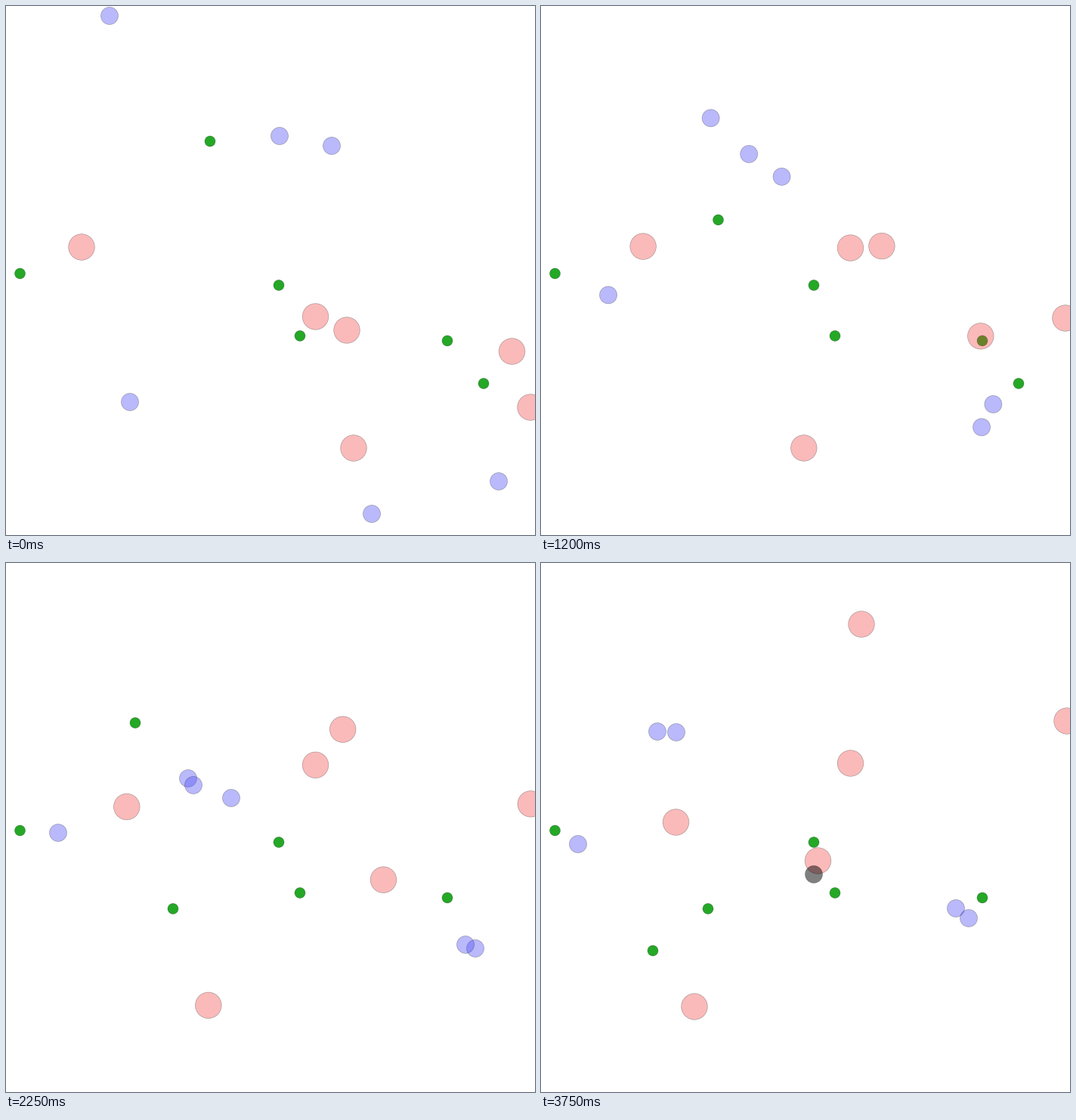
A matplotlib script for the animation above (3.9 s loop, 700 by 700 pixels).

```python
import numpy as np
import matplotlib.pyplot as plt
from matplotlib.animation import FuncAnimation
from matplotlib.patches import Circle

SIZE, DPI = 700, 100
FRAMES, STEP_MS = 26, 150
FRAME = np.arange(FRAMES)
KEYS = np.array([0, 6, 10, 15, 21, 25])

RED = (0.95, 0.21, 0.21, 0.34)
BLUE = (0.30, 0.30, 0.96, 0.39)
GREEN = (0.14, 0.66, 0.15, 1)
DEAD = (0, 0, 0, 0.5)
REACH = 20  # a hunter this close kills


def glide(start, end, bend=(0, 0)):
    """A straight run at steady speed, swelling sideways by bend midway."""
    s = (FRAME / (FRAMES - 1))[:, None]
    start, end, bend = map(np.array, (start, end, bend))
    return start + (end - start) * s + bend * np.sin(np.pi * s) ** 2


def wander(*points):
    """A smooth cubic curve that meets one point at each key time."""
    p = np.array(points, float)
    slope = np.gradient(p, KEYS, axis=0)
    i = np.clip(np.searchsorted(KEYS, FRAME, side="right") - 1, 0, len(KEYS) - 2)
    h = np.diff(KEYS)[i][:, None]
    s = (FRAME - KEYS[i])[:, None] / h
    return ((1 + 2 * s) * (1 - s) ** 2 * p[i] + s * (1 - s) ** 2 * h * slope[i]
            + s ** 2 * (3 - 2 * s) * p[i + 1] + s ** 2 * (s - 1) * h * slope[i + 1])


hunters = [
    glide((100, 319), (178.5, 343), (14, -12)),
    glide((409.5, 411), (409.5, 265), (0, -62)),
    glide((451, 429), (424, 81), (12, 0)),
    glide((669.5, 457), (366.5, 394), (13, 0)),
    glide((694, 531), (696, 209), (-1, -21)),
    glide((460, 585), (203, 587), (-42, -1)),
]

grazers = [
    wander((137, 13), (192, 111), (252, 187), (241, 285), (204, 265), (154, 223)),
    wander((431, 185), (285, 195), (273, 204), (248, 294), (214, 235), (179, 224)),
    wander((362, 172), (317, 219), (321, 236), (298, 311), (321, 373), (361, 412)),
    wander((164, 524), (114, 421), (68, 352), (69, 357), (60, 364), (49, 372)),
    wander((484, 672), (554, 589), (608, 530), (621, 510), (556, 487), (549, 457)),
    wander((652, 629), (604, 543), (597, 516), (608, 505), (563, 480), (566, 470)),
]

# Each food spot: (first frame, x, y), moved elsewhere once eaten.
foods = [
    [(0, 18.5, 354)],
    [(0, 361, 369.5)],
    [(0, 389, 436.5)],
    [(0, 584, 443)],
    [(0, 632, 499.5), (13, 221, 457.5)],
    [(0, 270, 179), (7, 234.5, 283), (15, 171, 211.5), (24, 148, 513)],
]

fig = plt.figure(figsize=(SIZE / DPI, SIZE / DPI), dpi=DPI, facecolor="white")
ax = fig.add_axes([0, 0, 1, 1])
ax.set_xlim(0, SIZE)
ax.set_ylim(SIZE, 0)
ax.axis("off")


def dots(count, radius, color, z):
    return [ax.add_patch(Circle((0, 0), radius, fc=color, ec=(0, 0, 0, 0.3),
                                lw=0.5, zorder=z)) for _ in range(count)]


food_dots = dots(len(foods), 7, GREEN, 1)
hunter_dots = dots(len(hunters), 17.3, RED, 2)
grazer_dots = dots(len(grazers), 11.5, BLUE, 3)


def caught(grazer, frame):
    return any(np.hypot(*(h[frame] - grazer[frame])) < REACH for h in hunters)


def update(frame):
    for d, spots in zip(food_dots, foods):
        d.center = [s[1:] for s in spots if s[0] <= frame][-1]
    for d, p in zip(hunter_dots, hunters):
        d.center = p[frame]
    for d, p in zip(grazer_dots, grazers):
        d.center = p[frame]
        d.set_facecolor(DEAD if caught(p, frame) else BLUE)
    return food_dots + hunter_dots + grazer_dots


anim = FuncAnimation(fig, update, frames=FRAMES, interval=STEP_MS, repeat=True,
                     repeat_delay=0, blit=False)
plt.show()
```
